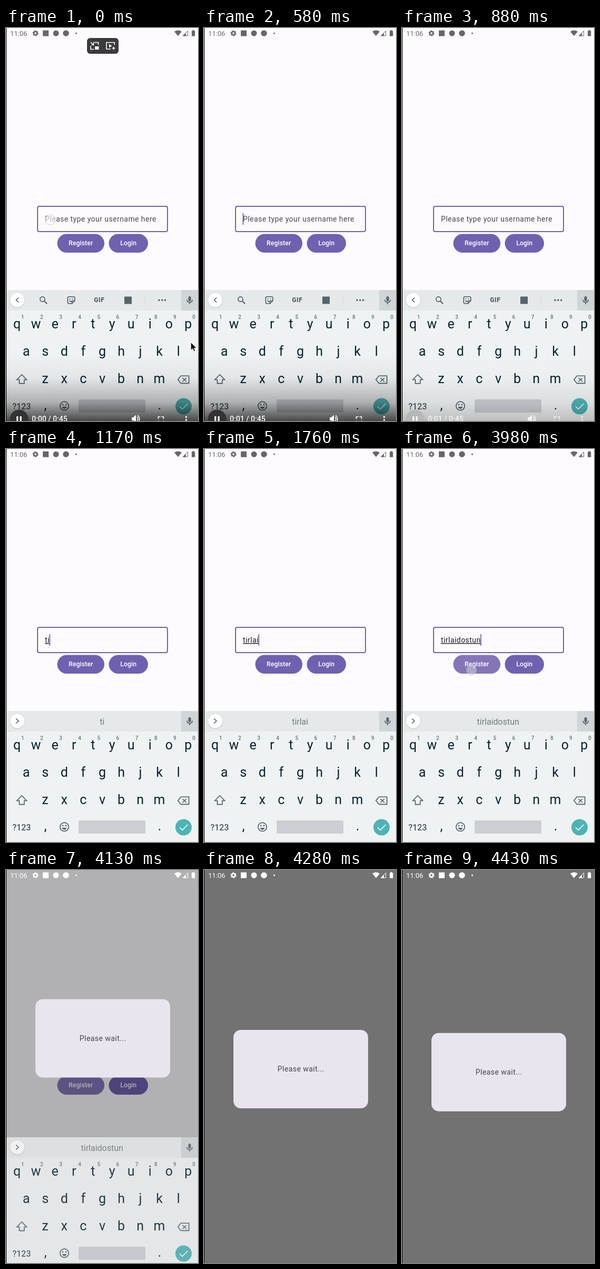
Write an HTML page that moves like this. It is 365 px wide and 747 px high and loops after 8 s.

```html
<!DOCTYPE html>
<html lang="en">
<head>
<meta charset="utf-8">
<title>Sign in</title>
<style>
html, body { margin: 0; width: 100%; height: 100%; overflow: hidden; background: #fdfbfe; }
svg { display: block; font-family: Roboto, sans-serif; }
text { white-space: pre; }
.mid { text-anchor: middle; }
.body { font-size: 14px; letter-spacing: .44px; }
.btn { font-size: 12.25px; font-weight: 500; letter-spacing: .09px; fill: #fff; }
.key { font-size: 25px; fill: #08222f; }
.digit { font-size: 10px; font-weight: 500; fill: #66737a; }
.line { fill: none; stroke: #4b5a62; stroke-width: 1.6; }
.tool { fill: #56636a; }
.white { fill: none; stroke: #fff; stroke-width: 1.6; }
</style>
</head>
<body>
<svg width="365" height="747" viewBox="0 0 365 747">
  <defs>
    <linearGradient id="shade" x1="0" y1="0" x2="0" y2="1">
      <stop offset="0" stop-opacity="0"/>
      <stop offset=".35" stop-opacity=".05"/>
      <stop offset=".72" stop-opacity=".27"/>
      <stop offset="1" stop-opacity=".7"/>
    </linearGradient>
    <filter id="soft" x="-30%" y="-30%" width="160%" height="160%">
      <feDropShadow dx="0" dy=".7" stdDeviation=".8" flood-opacity=".25"/>
    </filter>
  </defs>
  <rect width="365" height="747" fill="#fdfbfe"/>

  <g id="form">
    <rect x="60" y="339" width="247" height="48" rx="3" fill="none" stroke="#7361ae" stroke-width="2"/>
    <text id="hint" class="body" x="74" y="368" fill="#4b4751">Please type your username here</text>
    <text id="typed" class="body" x="74" y="368" fill="#1d1b20" text-decoration="underline"></text>
    <rect id="caret" y="352" width="1.7" height="22" fill="#7361ae"/>
    <rect id="register" x="97.5" y="391.5" width="89.5" height="35.5" rx="17.75"/>
    <rect x="195.5" y="391.5" width="74.5" height="35.5" rx="17.75" fill="#7160b0"/>
    <text class="btn mid" x="142.2" y="413">Register</text>
    <text class="btn mid" x="232.7" y="413">Login</text>
    <circle id="touch" r="9.8" stroke="#aaa7ad" stroke-opacity=".55"/>
  </g>

  <rect id="scrim" width="365" height="747"/>

  <g id="status">
    <text x="8" y="14.5" font-size="13">11:06</text>
    <circle cx="56" cy="10" r="3.2" fill="none" stroke="currentColor" stroke-width="2.6"/>
    <circle cx="56" cy="10" r="4.8" fill="none" stroke="currentColor" stroke-width="1.6" stroke-dasharray="2.6 2.427"/>
    <rect x="70" y="4.5" width="11" height="11"/>
    <circle cx="95" cy="10" r="5.5"/>
    <circle cx="114" cy="10" r="5.8"/>
    <circle cx="133.5" cy="10" r="1.6"/>
    <path d="M320 6.8Q327 1.6 334 6.8L327 15.3Z"/>
    <path d="M336.6 14.8L345.6 5.5V14.8Z" fill="none" stroke="currentColor"/>
    <path d="M336 15.3L342 9V15.3Z"/>
    <path d="M353 5.5H354.7V4H357.7V5.5H359.3V15.5H353Z"/>
  </g>

  <g id="keyboard">
    <rect y="498" width="365" height="260" fill="#eff2f3"/>
    <rect y="498" width="365" height="39" fill="#e6e9ea"/>
    <rect x="333" y="498" width="32" height="39" fill="#d0d5d8"/>
    <circle cx="21.5" cy="517" r="13.3" fill="#fff" filter="url(#soft)"/>
    <path id="chevron" class="line"/>
    <g id="tools">
      <g class="line">
        <circle cx="69.3" cy="515.5" r="4.6"/>
        <path d="M72.6 518.8L78 524.2" stroke-width="2"/>
        <path d="M119.5 510.8H128.5Q130.8 510.8 130.8 513V518.5L125.5 523.7H119.5Q117.3 523.7 117.3 521.5V513Q117.3 510.8 119.5 510.8ZM125.5 523.5V518.5H130.6M120.5 518Q122 520.5 124.5 520"/>
      </g>
      <g class="tool">
        <circle cx="121.5" cy="515" r="1"/><circle cx="126.5" cy="515" r="1"/>
        <text class="mid" x="177.3" y="521.2" font-size="12" font-weight="900" letter-spacing=".6">GIF</text>
        <rect x="225" y="510.5" width="14" height="14"/>
        <circle cx="291" cy="517.3" r="1.8"/><circle cx="296.8" cy="517.3" r="1.8"/><circle cx="302.6" cy="517.3" r="1.8"/>
      </g>
      <path d="M264.5 508V527" stroke="#d2d6d8"/>
    </g>
    <text id="suggest" class="mid" x="182.7" y="523.5" font-size="16" fill="#707a80"></text>
    <rect class="tool" x="346.6" y="510" width="5" height="9.5" rx="2.5"/>
    <path class="line" d="M344 516.5Q344 521.5 349.1 521.5T354.2 516.5M349.1 521.5V525"/>
    <g id="keys"></g>
    <path class="line" d="M30 658.8L39.3 668.5H34.7V675.6H25.3V668.5H20.7Z"/>
    <path class="line" d="M332.5 661.3H347.7V675.4H332.5L326.8 668.3ZM335.5 665L343 672M343 665L335.5 672"/>
    <text class="mid" x="29.7" y="724.5" font-size="16" font-weight="500" fill="#47565f">?123</text>
    <circle class="line" cx="111" cy="718.3" r="8.2"/>
    <circle class="tool" cx="108" cy="716" r="1.4"/><circle class="tool" cx="114" cy="716" r="1.4"/>
    <path class="tool" d="M106.5 720H115.5Q114 723.7 111 723.7T106.5 720Z"/>
    <rect x="138" y="706" width="127" height="25" rx="2.5" fill="#cbced3"/>
    <circle cx="337.5" cy="719" r="15.5" fill="#4db4b4"/>
    <path class="white" d="M330 719.2L335.2 724.4L345.5 714" stroke-width="2"/>
  </g>

  <g id="dialog">
    <rect x="56" width="256" height="149" rx="14" fill="#e9e4ee"/>
    <text class="body mid" x="184.2" y="79" fill="#4a4650">Please wait...</text>
  </g>

  <g id="player">
    <rect y="620" width="365" height="127" fill="url(#shade)"/>
    <circle cx="25" cy="743" r="17.5" fill="#333"/>
    <path d="M20 738H23.2V750H20ZM26.4 738H29.6V750H26.4ZM239 740H242L247 735.5V750L242 746H239Z" fill="#fff"/>
    <path class="white" d="M249 739Q252.5 743 249 747M250.5 736Q257 743 250.5 750M289.5 743V739H293.5M295.5 739H299.5V743M289.5 746V750M299.5 746V750"/>
    <text id="clock" x="49" y="748" font-size="14" font-weight="500" fill="#fff"></text>
    <g fill="#fff"><circle cx="342.5" cy="739.5" r="1.7"/><circle cx="342.5" cy="745" r="1.7"/></g>
  </g>
  <g id="hover">
    <rect x="154" y="19" width="60" height="30" rx="6" fill="#3b3b3b"/>
    <path class="white" d="M166 27.5H175.5V32M161 34V40.5H167M161 27L166 32M166.3 28.5V32.3H162.5M206 32V27.5H191V40H199" stroke-width="1.5"/>
    <path d="M169 35H176.5V41H169ZM196 30.5L201.5 34L196 37.5ZM204.5 34.5L205.6 37.4L208.5 38.5L205.6 39.6L204.5 42.5L203.4 39.6L200.5 38.5L203.4 37.4Z" fill="#fff"/>
    <path d="M351.5 597.5V612.5L355 609.3L357.3 614.5L359.7 613.4L357.4 608.4H362Z" stroke="#fff" stroke-width=".8"/>
  </g>
  <rect width="1" height="747"/>
</svg>
<script>
const LOOP = 8000, NAME = 'tirlaidostun';
const $ = id => document.getElementById(id);
const set = (id, attrs) => { for (const k in attrs) $(id).setAttribute(k, attrs[k]); };
const show = (id, on) => set(id, { opacity: +on });

// Value of the last [time, value] step reached
const step = (t, steps) => steps.reduce((v, [at, next]) => t >= at ? next : v, 0);

const key = (c, x, y, cls = 'key') => `<text class="${cls} mid" x="${x}" y="${y}">${c}</text>`;
const row = (chars, x, y, cls) => [...chars].map((c, i) => key(c, x + i * 36.15, y, cls)).join('');
$('keys').innerHTML = row('qwertyuiop', 20.8, 571) + row('1234567890', 31.7, 553, 'digit') +
  row('asdfghjkl', 38.5, 623) + row('zxcvbnm', 74.5, 675) + key(',', 75, 725) + key('.', 292, 725);

const letters = [[1030, 1], [1170, 2], [1320, 3], [1470, 4], [1620, 5], [1760, 6],
  [2210, 8], [2360, 9], [2510, 10], [2650, 11], [2790, 12]];
const caretOn = [[290, 1], [880, 0], [1170, 1], [3390, 0], [3830, 1]];
const playerAlpha = [[0, 1], [730, .65], [880, .3], [1030, 0]];
const dialogTop = [[4130, 245.5], [4280, 304], [4430, 309.7]];

function draw(t) {
  const n = step(t, letters), word = NAME.slice(0, n), waiting = t >= 4130;

  $('typed').textContent = $('suggest').textContent = word;
  show('hint', !n);
  show('tools', !n);
  set('chevron', { d: n ? 'M19 512.5L23.7 517L19 521.5' : 'M24 512.5L19.3 517L24 521.5' });
  set('caret', { x: 73.5 + (n ? $('typed').getComputedTextLength() : 0), opacity: step(t, caretOn) });

  const early = t < 140;
  set('touch', {
    cx: early ? 84 : 132, cy: early ? 364.5 : 420,
    fill: early ? '#fff' : '#d9d5dd', 'fill-opacity': early ? .6 : .5,
    opacity: +(early || t >= 3830 && !waiting)
  });
  set('register', { fill: t >= 3980 ? '#8575b8' : '#7160b0' });

  show('form', t < 4280);
  set('scrim', { opacity: step(t, [[4130, .3], [4280, .545]]) });
  const tint = waiting ? '#fff' : '#68666b';
  set('status', { fill: tint, color: tint });
  set('keyboard', {
    transform: `translate(0 ${waiting ? 10 : 0})`,
    opacity: step(t, [[0, 1], [4130, .83], [4280, 0]])
  });
  set('dialog', { transform: `translate(0 ${step(t, dialogTop)})`, opacity: +waiting });

  set('player', { opacity: step(t, playerAlpha) });
  $('clock').textContent = `0:0${t < 580 ? 0 : 1} / 0:45`;
  show('hover', t < 580);
}

function tick() {
  draw(performance.now() % LOOP);
  requestAnimationFrame(tick);
}
tick();
</script>
</body>
</html>
```
